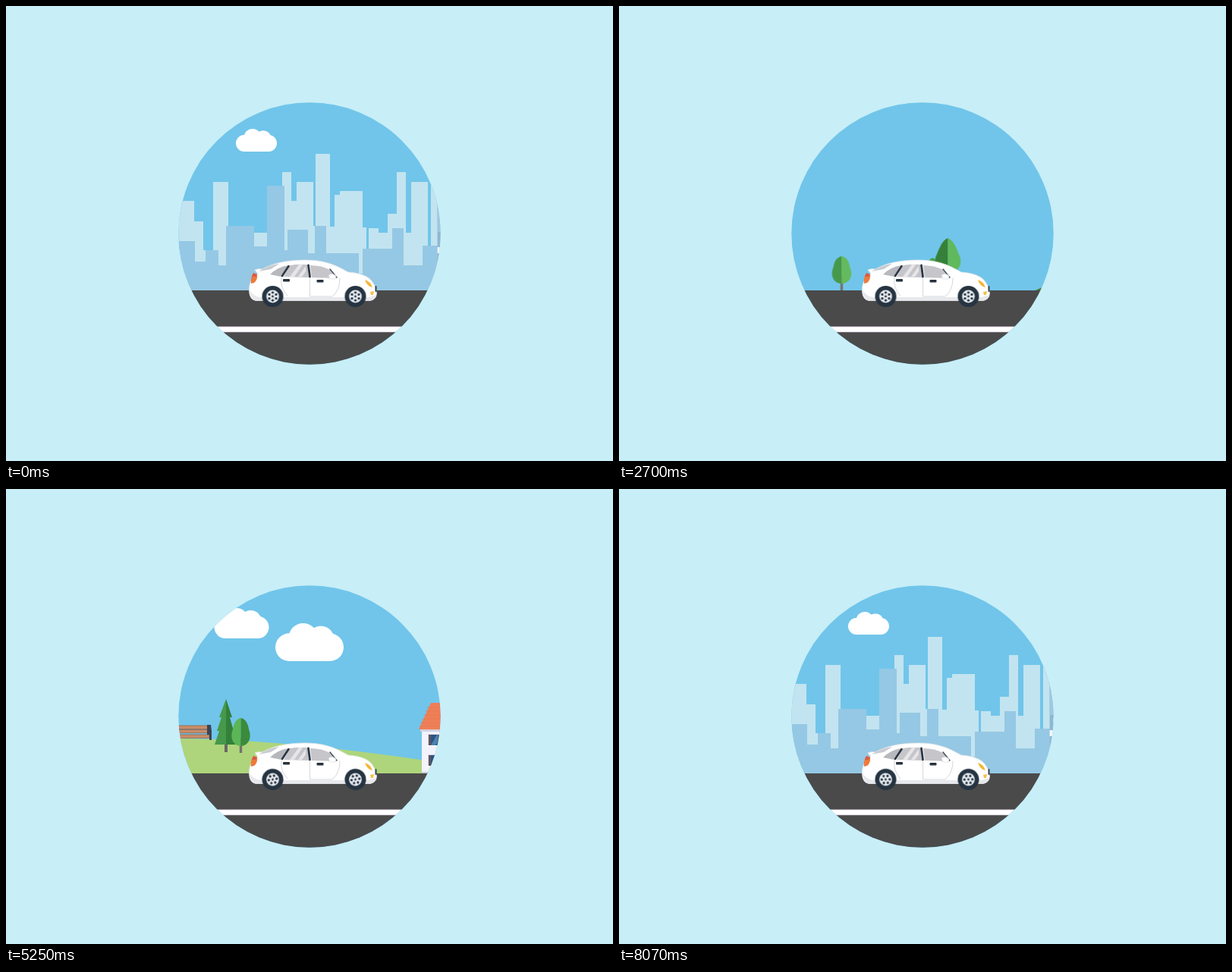
Recreate the animation shown at these times as an HTML page. Size 800 px wide and 600 px high, loop 8.1 s.

```html
<!DOCTYPE html>
<html lang="en">
<head>
<meta charset="utf-8">
<title>City drive</title>
<style>
  html, body { margin: 0; width: 100%; height: 100%; overflow: hidden; background: #c8eef7; }
  svg { display: block; width: 800px; height: 600px; }
  #strip { animation: scroll 8100ms steps(270) infinite; }
  .wheel { transform-box: fill-box; transform-origin: center; animation: spin 8100ms steps(270) infinite; }
  @keyframes scroll { to { transform: translateX(-3599.37px); } }
  @keyframes spin { to { transform: rotate(8640deg); } }
</style>
</head>
<body>
<svg id="stage" viewBox="0 0 800 600"></svg>
<script>
const STEP = 13.331;   // scroll per 30 ms
const GROUND = 376;
const SKY = '#71c5ea';

const rect = (x, y, w, h, fill, extra = '') =>
  `<rect x="${x}" y="${y}" width="${w}" height="${h}" fill="${fill}" ${extra}/>`;
const path = (d, fill, extra = '') => `<path d="${d}" fill="${fill}" ${extra}/>`;
const line = (d, color, w = 1) =>
  `<path d="${d}" fill="none" stroke="${color}" stroke-width="${w}" stroke-linecap="round"/>`;
const circle = (x, y, r, fill) => `<circle cx="${x}" cy="${y}" r="${r}" fill="${fill}"/>`;
const move = (x, y, body) => `<g transform="translate(${x} ${y})">${body}</g>`;
const at = (steps, ...parts) => move((steps * STEP).toFixed(1), 0, parts.join(''));
const times = (n, fn) => Array.from({ length: n }, (_, i) => fn(i)).join('');

function random(seed) {
  return () => (seed = (seed * 16807) % 2147483647) / 2147483647;
}

function cloud(x, y, width = 54) {
  return `<g transform="translate(${x} ${y}) scale(${width / 54})" fill="#fff">
    <rect y="8" width="54" height="22" rx="11"/>
    <circle cx="22" cy="11.5" r="11.5"/><circle cx="36" cy="12.7" r="10.5"/></g>`;
}

// pairs of left edge and roof height, closed at the right by end
function skyline(pairs, end, fill) {
  const d = pairs.map(([x, y]) => `H${x}V${y}`).join('');
  return path(`M${pairs[0][0]} ${GROUND}${d}H${end}V${GROUND}Z`, fill);
}

function city() {
  return skyline([[205, 257], [248, 284], [260, 322], [273, 232], [293, 342], [327, 299], [364, 219],
      [376, 257], [383, 232], [405, 290], [408, 195], [427, 291], [433, 249], [440, 244],
      [470, 292], [475, 322], [478, 293], [491, 299], [503, 274], [515, 219], [527, 299],
      [534, 232], [556, 318], [560, 234]], 592, '#c2e4f0')
    + skyline([[205, 310], [249, 337], [263, 322], [280, 342], [290, 290], [327, 317], [344, 237],
      [367, 322], [371, 295], [398, 326], [407, 290], [422, 326], [465, 353], [470, 320],
      [509, 293], [524, 342], [549, 316], [569, 340]], 600, '#95c8e4')
    + cloud(303, 162);
}

function skyscraper() {
  const rnd = random(77);
  const dashes = times(17, r => {
    const y = 130.5 + r * 13.2;
    const left = 186 + rnd() * 14;
    return rect(left, y, 22 + rnd() * 12, 5.5, '#e6eff8')
      + rect(left + 38 + rnd() * 10, y, 14 + rnd() * 14, 5.5, '#e6eff8')
      + rect(240 + rnd() * 16, y + 6.6, 17, 5, '#e6eff8');
  });
  return path('M182 376V150L200 118H276V376Z', '#8fb7d2')
    + path('M268 118L236 298H182V150L200 118Z', '#a0c7e0') + dashes
    + rect(182, 318, 14, 8, '#f2f7fb');
}

function glassBlock() {
  const panes = times(6, c => times(3, r =>
    rect(217 + c * 13.3, 312 + r * 16.5, 11, 15, '#1d4279')
    + path(`M${217 + c * 13.3} ${320 + r * 16.5}l7 -8h4v4l-11 11z`, '#376ca8')));
  return rect(250, 292, 22, 7, '#cdd5ee') + rect(214, 304, 84, 72, '#d5daf0')
    + rect(212, 298, 87, 8, '#e8eaf8') + rect(212, 306, 87, 3, '#b7bfe0') + panes
    + rect(214, 361, 84, 3, '#eef0fa');
}

// side places the bush: -1 left, 1 right
function tallTree(x, y, side = -1) {
  return move(x, y, rect(-1.5, 40, 3, 28, '#7b6a62')
    + `<g transform="scale(${-side} 1)">`
    + path('M-20 26C-26 28 -30 38 -28 45H-12C-12 36 -14 28 -20 26Z', '#49a14a') + '</g>'
    + path('M0 0C-9 4 -12 16 -16 25C-19 36 -14 45 0 45Z', '#36803a')
    + path('M0 0C9 4 12 16 16 25C19 36 14 45 0 45Z', '#60b95c'));
}

function roundTree(x, y, w, h, trunk, left, right) {
  const half = s => `M0 0C${s * w * .25} 1 ${s * w * .38} ${h * .2} ${s * w * .42} ${h * .4}
    C${s * w * .62} ${h * .75} ${s * w * .35} ${h} 0 ${h}Z`;
  return move(x, y, rect(-1.7, h * .7, 3.4, trunk - h * .7, '#76706c')
    + path(half(-1), left) + path(half(1), right));
}

function house() {
  const win = (x, y) => rect(x - 1, y - 1, 17, 16, '#d9d4e2') + rect(x, y, 15, 14, '#2b5482')
    + path(`M${x + 3} ${y + 14}l8 -14h4v5l-6 9z`, '#4d82b2')
    + rect(x, y, 3, 14, '#5d5560') + rect(x + 12, y, 3, 14, '#5d5560')
    + rect(x - 2, y + 14, 19, 2, '#fff');
  const tiles = times(6, i => line(`M${446 - i * 2} ${286 + i * 5}H${508 + i * 1.8}`, '#e67650', .7));
  return rect(439, 313, 78, 63, '#f3f3fc') + path('M480 376L517 330V376Z', '#e2e3f1')
    + rect(470, 276, 13, 5, '#d8663f')
    + path('M451 280H506L519 315H435Z', '#ef7f56') + tiles
    + rect(437, 315, 81, 3, '#d3d0e0')
    + times(3, i => win(448 + i * 21, 322) + win(448 + i * 21, 349))
    + rect(439, 371, 78, 4, '#c9cbdd');
}

function yellowBlock() {
  const panes = times(3, c => times(3, r => {
    const x = 518 + c * 20, y = 277 + r * 29;
    return rect(x - 1, y - 1, 15, 23, '#fffbe2') + rect(x, y, 13, 21, '#2f6ca8')
      + path(`M${x} ${y}h13l-13 16z`, '#5a9fd0');
  }));
  return rect(538, 247, 12, 8, '#e3dcb4') + rect(512, 262, 66, 114, '#f2eac0')
    + rect(508, 254, 73, 13, '#f6f1cf') + rect(508, 266, 73, 3, '#ded5a6') + panes
    + rect(557, 351, 17, 25, '#4b4954');
}

function smallBlock() {
  return rect(583, 272, 34.5, 104, '#d9d0e4') + rect(581, 266, 37, 7, '#eceaf6')
    + times(4, r => rect(587, 280 + r * 24, 11, 16, '#2d5f9a') + rect(602, 280 + r * 24, 11, 16, '#2d5f9a'));
}

function mountains() {
  return path('M80 376C130 353 190 351 238 352Q280 355 310 376Z', '#3f7b32')
    + path('M110 376C170 363 220 364 262 376Z', '#376f2c')
    + path('M354 376L469 261Q474 256 479 261L580 376Z', '#9caaab')
    + path('M474 258L496 284L430 350L440 320Z', '#93a1a3')
    + path('M404 376L538 241Q544 235 550 241L684 376Z', '#adbcc6')
    + path('M543.5 270V376H684L580 270Z', '#9ca9ad')
    + path(`M489 290L538 241Q544 235 550 241L600 291C590 280 580 296 573 292C566 283 552 281 545 286
      C538 292 537 300 530 300C522 300 522 283 508 281C499 281 495 284 489 290Z`, '#f8efec');
}

function park() {
  const plank = y => rect(190, y, 78, 4.3, '#c98d66', 'stroke="#8b6049" stroke-width=".7"');
  return path('M-70 376C20 335 130 328 230 329C330 330 450 342 580 362V376Z', '#aed57b')
    + plank(312) + plank(317.5) + plank(324)
    + path('M265 311h5l1 8v12h-3v-7h-3z', '#3a4454') + path('M190 311h5v20h-4z', '#3a4454')
    + rect(288, 334, 4, 13, '#6a6664')
    + path('M290 277L281 301H284L278 319H281L275 337H290Z', '#46994a')
    + path('M290 277L298 301H295L300 319H298L303 337H290Z', '#33803a')
    + roundTree(309.5, 302, 25, 37, 46, '#5cb556', '#3a8b3b');
}

function officeBlock() {
  const floors = times(4, r => {
    const y = 249 + r * 32;
    return rect(170, y, 145, 27, '#1d4680')
      + times(6, c => rect(182 + c * 25, y, 8, 27, '#14284a') + rect(194 + c * 25, y, 6, 27, '#275a99'))
      + rect(168, y + 27, 148, 4, '#f1f1fa');
  });
  return rect(240, 209, 19, 16, '#a9bdd8') + rect(168, 245, 148, 131, '#c8cde4') + floors
    + rect(166, 224, 150.5, 24, '#f2f2fb') + path('M302 248L317 236V248Z', '#c9cae2')
    + rect(166, 231, 150.5, 5, '#d6d8ec') + rect(170, 247, 147, 2, '#aab0cf');
}

const PANE = '#52616f';
function trainCar(x) {
  const win = (l, w) => rect(x + l, 265.5, w, 10, PANE);
  return rect(x + 1, 261, 87, 25, '#62abcf') + rect(x + 1, 285, 87, 7, '#ef8054')
    + win(17, 22) + win(41, 20) + win(63, 22);
}

function railway() {
  const bogie = x => rect(x, 288, 24, 4, '#48505c')
    + circle(x + 5, 291.5, 2.8, '#353c48') + circle(x + 18, 291.5, 2.8, '#353c48');
  const pillar = x => path(`M${x - 3} 304H${x + 3}V366L${x + 9} 376H${x - 9}L${x - 3} 366Z`, '#8b989f');
  return skyline([[318, 273], [324, 219], [336, 290], [343, 232], [363, 290], [368, 160], [386, 285],
      [398, 294], [400, 244], [429, 318]], 432, '#a9d9ee')
    + path('M432 304H440V318H464V306H480V318H488V306H506V345H512V376H430Z', '#a9d9ee')
    + rect(318, 304, 15, 72, SKY) + rect(333, 340, 24, 36, SKY) + rect(357, 316, 13, 60, SKY)
    + rect(378, 304, 43, 72, SKY)
    + pillar(375) + pillar(532) + pillar(689)
    + path('M482 261L486 255H526L530 261Z', '#6cabc8')
    + path('M411 288C422 272 438 261 460 261H568V292H416Q409 292 411 288Z', '#62abcf')
    + path('M411 288Q413 285 418 285H568V292H416Q409 292 411 288Z', '#ef8054')
    + path('M425 278C432 270 440 265.5 452 265.5H475V276Q445 275 425 278Z', PANE)
    + line('M448 266L445 276M459 266V276', '#7596ab', .8)
    + rect(481, 266, 9, 18, '#6fb5d6', 'rx="2" stroke="#47768f" stroke-width=".8"')
    + rect(483, 268, 5, 7, PANE) + rect(497, 265.5, 22, 10, PANE)
    + rect(521, 265.5, 20, 10, PANE) + rect(543, 265.5, 22, 10, PANE)
    + trainCar(570) + trainCar(660)
    + bogie(434) + bogie(525) + bogie(582) + bogie(715)
    + rect(300, 294, 500, 10, '#8d9aa2') + rect(300, 294, 500, 3, '#a7b3b9');
}

function wheel(x) {
  const holes = times(6, i =>
    `<circle cy="-5.2" r="1.6" fill="#2b3948" transform="rotate(${i * 60})"/>`);
  return move(x, 383, `<g class="wheel">${circle(0, 0, 14, '#263442')}
    ${circle(0, 0, 8.4, '#e4e8ec')}${holes}${circle(0, 0, 1.4, '#2b3948')}</g>`);
}

function car() {
  const glass = '#c5c5ca';
  return path(`M328 348Q332 346 338 347C350 340 368 335 394 335C418 335 432 340 451 351
      C466 352 478 356 483 364Q488 371 488.5 379Q488 387 480 388.5H329Q321 387 320.5 376
      C320 366 324 358 332 353Z`, '#fff', 'stroke="#e3e6ea" stroke-width=".8"')
    + path('M321 374Q322 387 330 388.5H480Q487 387 488 381L478 384H335Q325 383 321 374Z', '#e7e8ec')
    + path('M333 350C341 345 350 341 360 340L349 347Z', '#c9cbd1')
    + path('M348 354Q358 344 372 342L363 357Z', '#b7b8bd')
    + path('M366 357L374 342Q385 340 397 341L399 358Z', glass)
    + path('M401 342Q416 342 427 348L436 359L403 358Z', glass)
    + path('M374 357L386 341H391L380 357ZM385 357L395 343V350L390 357Z', '#e6e6e9')
    + line('M364 356L372.5 343', '#2b3644', 2.6) + line('M398.5 342L400.5 357', '#2b3644', 2.8)
    + line('M427 347L436 358', '#3f4855', 1.4)
    + line('M363 358Q361 372 371 382M400.5 360V383H430Q440 375 440 359', '#d5d7dc', 1)
    + path('M425 355Q430 351 435 356L434 360H427Z', '#fff', 'stroke="#d5d7dc" stroke-width=".6"')
    + rect(365, 360, 9, 3.4, '#28323f', 'rx="1"') + rect(409.5, 361, 9, 3.4, '#28323f', 'rx="1"')
    + path('M326 352L331 354Q332 361 327 365L323 366Q322 358 326 352Z', '#ee7a3b')
    + path('M326 352L331 354L329 357L324 357Z', '#d95a45')
    + path('M473 361Q480 363 483 371Q476 370 473 361Z', '#f5b433')
    + path('M480 377L485 376L484 381L481 381Z', '#f3c04c') + rect(486.5, 369, 2, 8, '#39424e', 'rx="1"')
    + wheel(351.5) + wheel(460.5);
}

const scenery = [
  at(0, city()),
  at(29, skyscraper(), glassBlock(), cloud(318, 187), tallTree(402, 303, 1), smallBlock(),
    yellowBlock(), house(), cloud(543, 155)),
  at(58, cloud(246, 226), tallTree(445, 306), cloud(557, 167),
    roundTree(516, 332, 24, 35, 44, '#46994a', '#64ba5d'),
    roundTree(720, 330, 26, 36, 46, '#46994a', '#64ba5d'), tallTree(860, 306)),
  at(125, mountains(), cloud(351, 192, 97), cloud(633, 182, 80)),
  at(175, park(), cloud(87, 146, 60), cloud(274.5, 157, 72), cloud(355, 177, 90), move(109, 2, house())),
  at(222, railway(), officeBlock(), cloud(740, 154)),
  move(3585, 0, city() + at(29, skyscraper(), glassBlock()))
].join('');

document.getElementById('stage').innerHTML = `
  <clipPath id="disc"><circle cx="400" cy="300" r="172.7"/></clipPath>
  <g clip-path="url(#disc)">
    ${rect(220, 120, 360, 360, SKY)}
    <g id="strip">${scenery}</g>
    ${rect(220, 375, 360, 110, '#4a4a4a')}
    ${rect(220, 422.6, 360, 7.6, '#e2d8e5')}${rect(220, 423.5, 360, 5.8, '#fff')}
    ${car()}
  </g>`;
</script>
</body>
</html>
```
